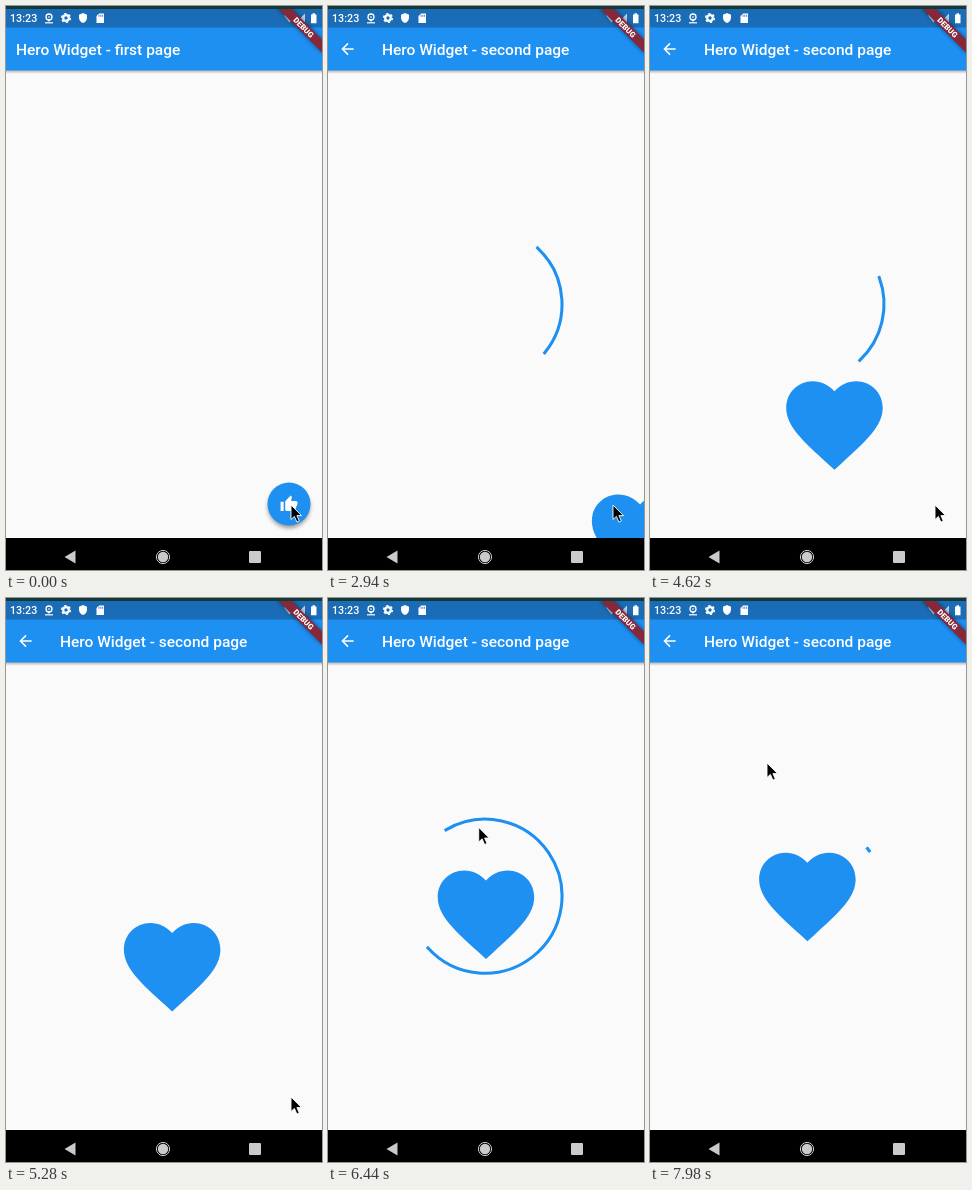
Recreate the animation shown at these times as an HTML page. Size 316 by 564 pixels, loop 8000 ms.

```html
<!DOCTYPE html>
<html lang="en">
<head>
<meta charset="utf-8">
<title>Hero Widget</title>
<style>
  html, body { margin: 0; width: 100%; height: 100%; overflow: hidden; background: #000; }
  svg { display: block; width: 316px; height: 564px; }
  text { font-family: Roboto, sans-serif; font-weight: 500; fill: #fff; }
  .title { font-size: 15.5px; }
  .blue { fill: #1e90f2; }
</style>
</head>
<body>
<svg viewBox="0 0 316 564">
  <defs>
    <linearGradient id="shade" x2="0" y2="1">
      <stop stop-color="#000" stop-opacity=".3"/>
      <stop offset="1" stop-color="#000" stop-opacity="0"/>
    </linearGradient>
    <filter id="soft" x="-50%" y="-50%" width="200%" height="200%"><feGaussianBlur stdDeviation="2"/></filter>
    <clipPath id="screen"><rect y="3" width="316" height="529"/></clipPath>
  </defs>

  <rect width="316" height="564" fill="#fafafa"/>
  <rect y="64" width="316" height="4" fill="url(#shade)"/>
  <rect class="blue" y="21" width="316" height="43.5"/>

  <g id="first">
    <text class="title" x="10" y="48.6">Hero Widget - first page</text>
    <circle cx="283" cy="501" r="21" opacity=".4" filter="url(#soft)"/>
    <circle class="blue" cx="283" cy="498" r="21.5"/>
    <path transform="translate(273.8 488.8) scale(.768)" fill="#fff" d="M1 21h4V9H1zM23 10c0-1.1-.9-2-2-2h-6.3l1-4.9c0-.4-.2-.8-.5-1.1L14.2 1 7.6 7.6C7.2 8 7 8.5 7 9v10c0 1.1.9 2 2 2h9c.8 0 1.5-.5 1.8-1.2l3-7.1c.1-.2.2-.4.2-.7z"/>
  </g>

  <g id="second">
    <path transform="translate(10.3 33.8) scale(.768)" fill="#fff" d="M20 11H7.8l5.6-5.6L12 4l-8 8 8 8 1.4-1.4L7.8 13H20z"/>
    <text class="title" x="54" y="48.6">Hero Widget - second page</text>
    <path id="spinner" fill="none" stroke="#1e90f2" stroke-width="3.07" stroke-linecap="square"/>
    <g clip-path="url(#screen)">
      <path id="heart" class="blue" d="M12 21.35l-1.45-1.32C5.4 15.36 2 12.28 2 8.5 2 5.42 4.42 3 7.5 3c1.74 0 3.41.81 4.5 2.09C13.09 3.81 14.76 3 16.5 3 19.58 3 22 5.42 22 8.5c0 3.78-3.4 6.86-8.55 11.54z"/>
    </g>
  </g>

  <!-- Status bar -->
  <rect width="316" height="3.5" fill="#123838"/>
  <rect y="3" width="316" height="18.5" fill="#1b6cb6"/>
  <text x="4" y="16" font-size="10.75">13:23</text>
  <g fill="#fff">
    <path d="M39 16.2h8v1.2h-8z"/>
    <circle cx="43" cy="11" r="3" fill="none" stroke="#fff" stroke-width="1.3"/>
    <path d="M41.4 13.5h3.2L43 16zM42.3 10.3h1.4v1.4h-1.4z"/>
    <circle cx="60" cy="12" r="2.8" fill="none" stroke="#fff" stroke-width="2.2"/>
    <circle cx="60" cy="12" r="4.4" fill="none" stroke="#fff" stroke-width="1.4" stroke-dasharray="2.3"/>
    <path d="M77 7l4 1.7v3c0 2.5-1.7 4.6-4 5.3-2.3-.7-4-2.8-4-5.3v-3z"/>
    <path d="M93.2 7.5H98V17h-7.5v-7z"/>
    <path d="M278 9.5q5.5-3.5 11 0l-5.5 7zM290 16.500h9v-9z" opacity=".7"/>
    <path d="M305 8.500h1.500v-1.200h2.500v1.200h1.500v8.700H305z"/>
  </g>
  <path d="M93 8.800v2m1.800-2v2m1.800-2v2" stroke="#1b6cb6" stroke-width=".8"/>

  <!-- Corner banner -->
  <g clip-path="url(#screen)">
    <g transform="translate(316 3) rotate(45)">
      <rect x="-31" y="21.500" width="62" height="9.200" opacity=".5" filter="url(#soft)"/>
      <rect x="-31" y="21.500" width="62" height="9.200" fill="#86283a"/>
      <text y="28.900" font-size="7.800" text-anchor="middle" style="font-weight:900">DEBUG</text>
    </g>
  </g>

  <!-- Navigation bar -->
  <rect y="532" width="316" height="32"/>
  <g fill="#cacaca">
    <path d="M58.500 551l11-6.500v13z"/>
    <circle cx="157" cy="551" r="5.200"/>
    <circle cx="157" cy="551" r="6.600" fill="none" stroke="#cacaca"/>
    <rect x="243" y="545" width="12" height="12" rx="1"/>
  </g>

  <path id="cursor" stroke="#fff" stroke-width=".9" d="M0 0v14.500l3.400-3.100 2.500 5.700 2.400-1.100-2.400-5.400h4.600z"/>
</svg>

<script>
const LOOP = 8000;
const BLOCK = 420;          // each block holds its first pose for 100 ms, then steps every 40 ms
const PUSH_STEP = 61;       // step at which the second page replaces the first
const SPINNER = { x: 157, y: 298.2, r: 77 };
const FLIGHT = { x: 99.5, y: 240.2, rx: 200, ry: 240, sweep: 1.38 };
const ICON_SCALE = 115.8 / 24;
const CURSOR_KEYS = [       // step, x, y
  [124, 285, 499], [137, 206, 372], [141, 205, 368],
  [158, 129, 174], [182, 129, 174], [189, 117, 165]
];

const $ = id => document.getElementById(id);
const clamp = v => Math.min(1, Math.max(0, v));
const moveTo = (id, x, y, scale = 1) =>
  $(id).setAttribute('transform', `translate(${x} ${y}) scale(${scale})`);

// cubic-bezier(.4, 0, .2, 1)
function fastOutSlowIn(x) {
  x = clamp(x);
  let lo = 0, hi = 1;
  for (let i = 0; i < 24; i++) {
    const m = (lo + hi) / 2, n = 1 - m;
    if (1.2 * m * n * n + .6 * m * m * n + m ** 3 < x) lo = m; else hi = m;
  }
  return lo * lo * (3 - 2 * lo);
}

function stepAt(ms) {
  const local = ms % BLOCK;
  return Math.floor(ms / BLOCK) * 10 + (local < 100 ? 0 : Math.floor((local - 60) / 40));
}

function drawSpinner(seconds) {
  const cycle = Math.floor(seconds), p = seconds - cycle;
  const head = fastOutSlowIn(p * 2), tail = fastOutSlowIn(p * 2 - 1);
  const start = Math.PI * (-.5 + 1.5 * tail + 1.7 * p - .8 * cycle);
  const sweep = Math.max(1.5 * Math.PI * (head - tail), .001);
  const { x, y, r } = SPINNER;
  const point = a => `${x + r * Math.cos(a)} ${y + r * Math.sin(a)}`;
  $('spinner').setAttribute('d',
    `M${point(start)}A${r} ${r} 0 ${+(sweep > Math.PI)} 1 ${point(start + sweep)}`);
}

// The heart flies along an elliptic arc that ends heading straight up.
function drawHeart(seconds) {
  const { x, y, rx, ry, sweep } = FLIGHT;
  const angle = sweep * (1 - fastOutSlowIn(seconds / 2 + .032));
  moveTo('heart', x + rx * (1 - Math.cos(angle)), y + ry * Math.sin(angle), ICON_SCALE);
}

function drawCursor(step) {
  let [, x, y] = CURSOR_KEYS[0];
  for (let i = 1; i < CURSOR_KEYS.length; i++) {
    const [s0, ax, ay] = CURSOR_KEYS[i - 1], [s1, bx, by] = CURSOR_KEYS[i];
    if (step < s0) break;
    const k = clamp((step - s0) / (s1 - s0)), e = k * k * (3 - 2 * k);
    x = ax + (bx - ax) * e;
    y = ay + (by - ay) * e;
  }
  moveTo('cursor', x, y);
}

function draw(ms) {
  const step = stepAt(ms % LOOP);
  const pushed = step >= PUSH_STEP;
  $('first').style.display = pushed ? 'none' : '';
  $('second').style.display = pushed ? '' : 'none';
  if (pushed) {
    const seconds = .015 * step - .909;
    drawSpinner(seconds);
    drawHeart(seconds);
  }
  drawCursor(step);
}

let origin;
function tick(now) {
  origin ??= now;
  draw(now - origin);
  requestAnimationFrame(tick);
}
draw(0);
requestAnimationFrame(tick);
</script>
</body>
</html>
```
